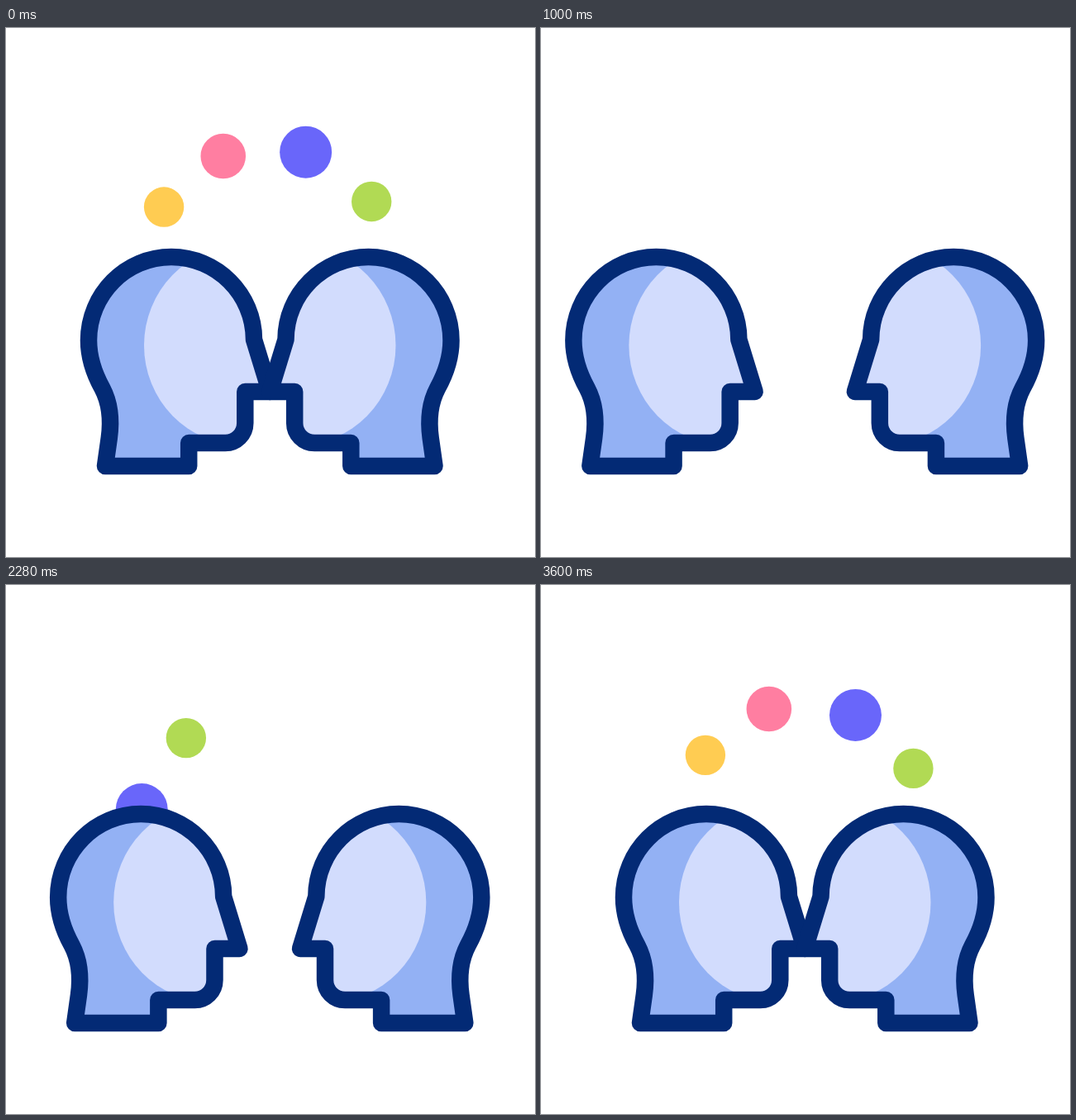
Recreate the animation shown at these times as an HTML page with a canvas. Size 640 px wide and 640 px high, loop 3.62 s.

```html
<!DOCTYPE html>
<html lang="en">
<head>
<meta charset="utf-8">
<title>Exchange of ideas</title>
<style>
  html, body { margin: 0; width: 100%; height: 100%; overflow: hidden; background: #fff; }
  canvas { display: block; width: 640px; height: 640px; }
</style>
</head>
<body>
<canvas id="stage" width="640" height="640"></canvas>
<script>
const ctx = document.getElementById('stage').getContext('2d');
const LOOP = 3620;
const AXIS = 319.25;
const SPREAD = 64;
const SPEED = 0.00304; // radians per ms along the arc

const NAVY = '#032a75', BLUE = '#93b1f4', LIGHT = '#d2dcfd';

const head = new Path2D(
  'M100 378 C100 322 145 277 200 277 C255 277 300 322 300 377 ' +
  'L319.3 440 H289.3 V478 A24 24 0 0 1 265.3 502 H221.2 V530 H120 ' +
  'L124.8 496 C127.5 476 126 454 116.5 436 C106 417 100 398 100 378 Z');
const face = new Path2D();
face.ellipse(285, 384, 118, 120.5, 0, 0, Math.PI * 2);

// Balls in left-to-right leading order
const balls = [
  { color: '#b1da54', r: 24.2 },
  { color: '#6966fa', r: 31.5 },
  { color: '#ff7ea1', r: 27.3 },
  { color: '#ffcc52', r: 24.2 }
];

// tops: moment each ball crosses the top of the arc
const passes = [
  { until: 900, dir: 1, tops: [-273, -87, 113, 287] },
  { until: 2700, dir: -1, tops: [2066, 1890, 1699, 1526] },
  { until: LOOP, dir: 1, tops: [3302, 3476, 3686, 3864] }
];

const clamp = (v, lo, hi) => Math.min(hi, Math.max(lo, v));

function ease(t, start, end) {
  const u = clamp((t - start) / (end - start), 0, 1);
  return u * u * (3 - 2 * u);
}

function headShift(t) {
  return SPREAD * (ease(t, 23, 893) - ease(t, 893, 1663)
    + ease(t, 1745, 2717) - ease(t, 2717, 3552));
}

function drawBalls(t) {
  const { dir, tops } = passes.find(p => t < p.until);
  balls.forEach((ball, i) => {
    const angle = dir * clamp(SPEED * (t - tops[i]), -Math.PI / 2, Math.PI / 2);
    ctx.fillStyle = ball.color;
    ctx.beginPath();
    ctx.arc(319 + 167 * Math.sin(angle), 349 - 206 * Math.cos(angle), ball.r, 0, Math.PI * 2);
    ctx.fill();
  });
}

function drawHead(shift, mirrored) {
  ctx.save();
  if (mirrored) {
    ctx.translate(2 * AXIS, 0);
    ctx.scale(-1, 1);
  }
  ctx.translate(-shift, 0);
  ctx.fillStyle = BLUE;
  ctx.fill(head);
  ctx.save();
  ctx.clip(head);
  ctx.fillStyle = LIGHT;
  ctx.fill(face);
  ctx.restore();
  ctx.strokeStyle = NAVY;
  ctx.lineWidth = 20.5;
  ctx.lineJoin = 'round';
  ctx.stroke(head);
  ctx.restore();
}

function draw(t) {
  ctx.fillStyle = '#fff';
  ctx.fillRect(0, 0, 640, 640);
  drawBalls(t);
  const shift = headShift(t);
  drawHead(shift, false);
  drawHead(shift, true);
}

let began;
function tick(now) {
  began ??= now;
  draw(Math.max(0, now - began) % LOOP);
  requestAnimationFrame(tick);
}
draw(0);
requestAnimationFrame(tick);
</script>
</body>
</html>
```
